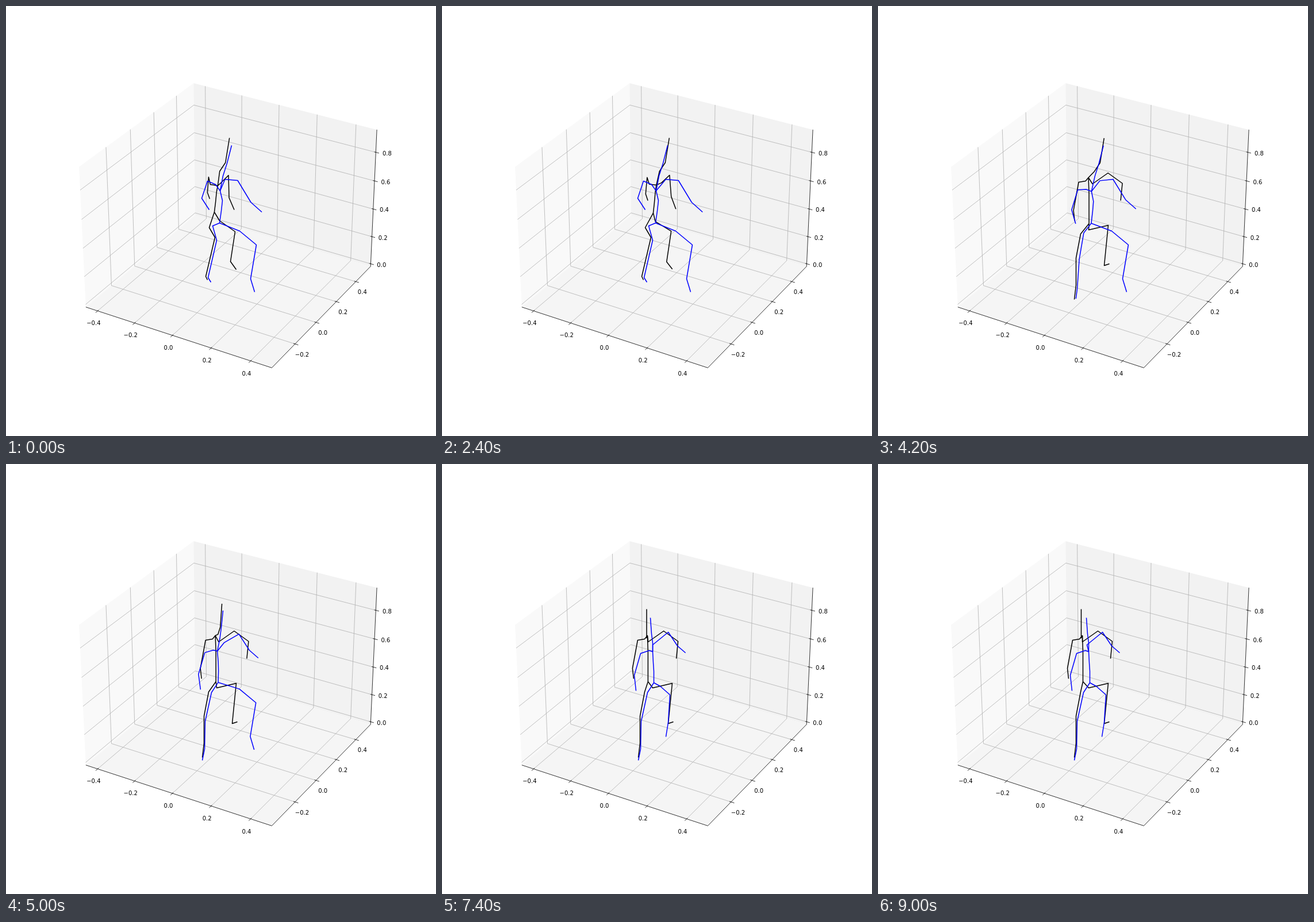
An HTML page with a canvas for the animation above (9200 ms loop, 748 px wide and 748 px high).

```html
<!DOCTYPE html>
<html lang="en">
<head>
<meta charset="utf-8">
<title>Two walking skeletons</title>
<style>
html, body { margin: 0; width: 100%; height: 100%; overflow: hidden; background: #fff; }
canvas { display: block; }
</style>
</head>
<body>
<canvas id="stage" width="748" height="748"></canvas>
<script>
const ctx = document.getElementById('stage').getContext('2d');
const LOOP = 9200, STEP = 200;

// Perspective view of the 4:4:3 box: elevation 30, azimuth -60 degrees.
// Coordinates run from 0 to 1 along each side of the box.
function project([fx, fy, fz]) {
  const x = (fx - 0.5) * 1.1905, y = (fy - 0.5) * 1.1905, z = (fz - 0.5) * 0.8929;
  const sin = Math.sqrt(3) / 2;
  const right = sin * x + y / 2;
  const up = -x / 4 + sin * y / 2 + sin * z;
  const near = sin * x / 2 - sin * sin * y + z / 2;
  const scale = 311.33 / (1 - near / 10);
  return [391.1 + right * scale, 369.96 - up * scale];
}

const axes = [
  { min: -0.4646, range: 0.97, first: -0.4, last: 0.4, out: [0, -1, 0],
    line: f => [[f, 0, 0], [f, 1, 0], [f, 1, 1]], label: f => [f, -0.037, -0.062] },
  { min: -0.413, range: 0.97, first: -0.2, last: 0.4, out: [1, 0, 0],
    line: f => [[1, f, 0], [0, f, 0], [0, f, 1]], label: f => [1.037, f, -0.062] },
  { min: -0.0195, range: 0.975, first: 0, last: 0.8, out: [1, 0, 0],
    line: f => [[1, 1, f], [0, 1, f], [0, 0, f]], label: f => [1.05, 1.018, f] }
];

function trace(points) {
  ctx.beginPath();
  for (const [x, y] of points) ctx.lineTo(x, y);
}

function stroke(points, color, width) {
  trace(points);
  ctx.strokeStyle = color;
  ctx.lineWidth = width;
  ctx.stroke();
}

function pane(corners, color) {
  trace(corners.map(project));
  ctx.fillStyle = color;
  ctx.fill();
}

function drawTick(axis, value) {
  const f = (value - axis.min) / axis.range;
  const line = axis.line(f);
  const shifted = d => project(line[0].map((c, i) => c + d * axis.out[i]));
  const [x, y] = project(axis.label(f));
  stroke(line.map(project), '#b0b0b0', 0.8);
  stroke([shifted(-1 / 120), shifted(1 / 60)], '#000', 0.8);
  ctx.fillStyle = '#000';
  ctx.fillText(value.toFixed(1).replace('-', '\u2212'), x, y + 3.6);
}

function drawAxes() {
  pane([[0, 0, 0], [0, 1, 0], [0, 1, 1], [0, 0, 1]], '#f9f9f9');
  pane([[0, 1, 0], [1, 1, 0], [1, 1, 1], [0, 1, 1]], '#f2f2f2');
  pane([[0, 0, 0], [1, 0, 0], [1, 1, 0], [0, 1, 0]], '#f5f5f5');
  ctx.font = '10px "DejaVu Sans", sans-serif';
  ctx.textAlign = 'center';
  for (const axis of axes) {
    const count = Math.round((axis.last - axis.first) / 0.2);
    for (let i = 0; i <= count; i++) drawTick(axis, (Math.round(axis.first * 5) + i) / 5);
  }
  stroke([[0, 0, 0], [1, 0, 0], [1, 1, 0], [1, 1, 1]].map(project), '#000', 0.8);
}

// Weights that carry a limb from its first pose to its second.
const easeAt = (middle, width) => time => {
  const u = Math.min(1, Math.max(0, (time - middle) / width + 0.5));
  return u * u * (3 - 2 * u);
};
const bounce = time => time < 3300 ? Math.sin(Math.PI * time / 2200) ** 2 : 1;

const limb = (from, to, weight, sway = 0) => ({ from, to, weight, sway });

const blue = {
  color: '#00f',
  trunk: limb([371,377, 374,356, 376,338, 372,321],
              [368,380, 368,360, 367,345, 366,326], easeAt(4600, 1800)),
  neck: limb([377,295, 384,273, 392,242],
             [366,311, 364,295, 362,267], easeAt(5000, 1800)),
  leftArm: limb([364,310, 350,304, 340,334, 353,354],
                [360,324, 345,329, 334,367, 337,394], easeAt(4000, 2800)),
  rightArm: limb([379,301, 401,303, 424,341, 443,358],
                 [373,314, 400,292, 416,316, 430,328], easeAt(4700, 2200), 10),
  leftLeg: limb([359,382, 366,407, 351,472, 356,480],
                [357,397, 346,447, 345,495, 341,515], easeAt(3700, 2200)),
  rightLeg: limb([406,391, 435,415, 425,474, 432,497],
                 [379,386, 396,401, 393,449, 389,474], easeAt(6000, 2400))
};

const black = {
  color: '#000',
  trunk: limb([361,358, 363,342, 365,322, 367,312],
              [362,378, 362,354, 362,326, 361,298], bounce, 6),
  neck: limb([370,287, 380,272, 387,229],
             [361,302, 361,291, 361,252], easeAt(4900, 1600), 8),
  leftArm: limb([354,310, 351,297, 349,324, 353,335],
                [356,304, 344,306, 335,355, 337,373], bounce, 6),
  rightArm: limb([372,307, 385,294, 386,333, 395,354],
                 [365,309, 392,290, 417,308, 414,338], bounce, 10),
  leftLeg: limb([353,385, 363,402, 347,470, 350,476],
                [352,396, 344,438, 344,485, 341,510], easeAt(3300, 1600)),
  rightLeg: limb([371,373, 398,392, 390,444, 400,458],
                 [366,389, 400,381, 393,451, 402,448], bounce)
};

function joints({ from, to, weight, sway }, time) {
  const w = weight(time);
  const shift = sway * Math.sin(2 * Math.PI * (5900 - time) / 12400);
  const mix = i => from[i] + (to[i] - from[i]) * w + 0.5;
  const points = [];
  for (let i = 0; i < from.length; i += 2) points.push([mix(i) + shift, mix(i + 1)]);
  return points;
}

function drawFigure(figure, time) {
  const trunk = joints(figure.trunk, time);
  const pelvis = trunk[0], chest = trunk[3];
  const drawLimb = (root, part) =>
    stroke([root, ...joints(part, time)], figure.color, 1.5);
  stroke([...trunk, ...joints(figure.neck, time)], figure.color, 1.5);
  drawLimb(pelvis, figure.leftLeg);
  drawLimb(pelvis, figure.rightLeg);
  drawLimb(chest, figure.leftArm);
  drawLimb(chest, figure.rightArm);
}

function draw() {
  const time = Math.floor(performance.now() % LOOP / STEP) * STEP;
  ctx.clearRect(0, 0, 748, 748);
  ctx.lineJoin = 'round';
  drawAxes();
  drawFigure(black, time);
  drawFigure(blue, time);
  requestAnimationFrame(draw);
}
draw();
</script>
</body>
</html>
```
